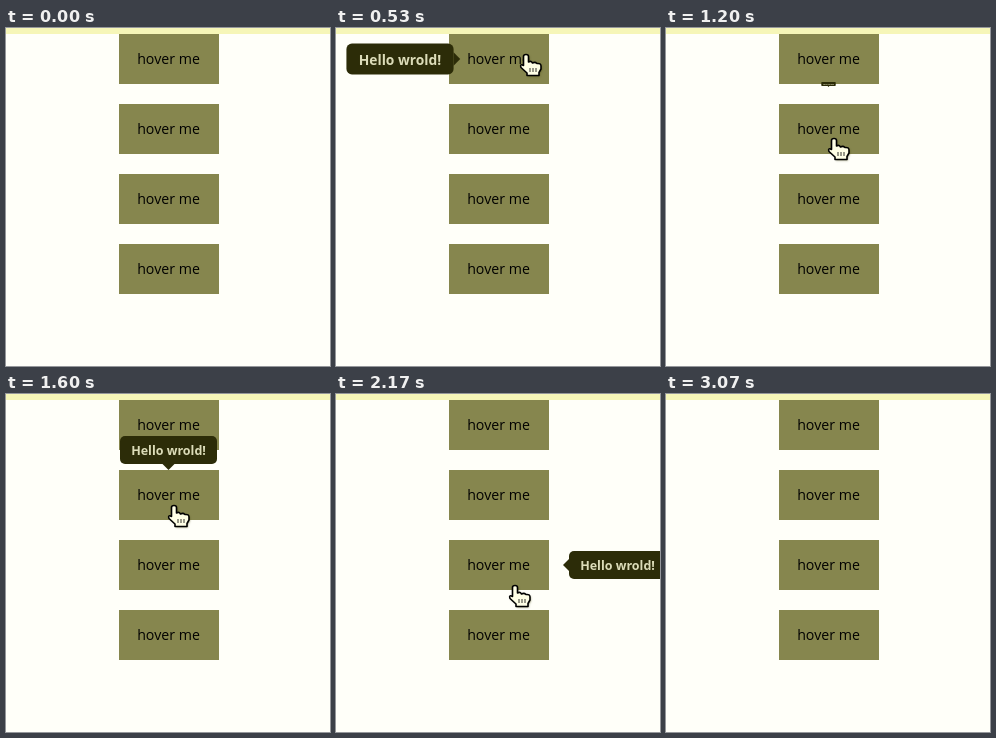
Animation, 324 px wide and 338 px high, one loop 4340 ms. Source, as an HTML page with a canvas:

```html
<!DOCTYPE html>
<html lang="en">
<head>
<meta charset="utf-8">
<title>Tooltips</title>
<style>
html, body { margin: 0; width: 100%; height: 100%; overflow: hidden; background: #fffff9; }
canvas { display: block; }
</style>
</head>
<body>
<canvas id="stage" width="324" height="338"></canvas>
<script>
const ctx = document.getElementById('stage').getContext('2d');
const LOOP = 4340, GROW = 200;
const FONT = '"Open Sans", "Noto Sans", sans-serif';
const BOX = { x: 113, w: 100, h: 50 };
const boxTop = i => 6 + 70 * i;

// One per button: body centre and the direction its arrow points
const tips = [
  { x: 64,    y: 31,  dx: 1,  dy: 0 },
  { x: 162.5, y: 56,  dx: 0,  dy: 1 },
  { x: 281.5, y: 171, dx: -1, dy: 0 },
  { x: 162.5, y: 290, dx: 0,  dy: -1 }
];

// Pointer moves; it rests between them
const entry = { x: 303, y: 168 };
const moves = [
  { from: 100,  to: 285,  x: 250, y: 60 },
  { from: 285,  to: 400,  x: 190, y: 26 },
  { from: 970,  to: 1000, x: 184, y: 57 },
  { from: 1000, to: 1202, x: 168, y: 111 },
  { from: 1590, to: 1740, x: 177, y: 182 },
  { from: 2140, to: 2220, x: 190, y: 239 },
  { from: 2815, to: 2920, x: 304, y: 153 }
];

function pointerAt(time) {
  if (time < moves[0].from || time > moves.at(-1).to) return null;
  let { x, y } = entry;
  for (const m of moves) {
    const k = Math.min(1, Math.max(0, (time - m.from) / (m.to - m.from))) ** 2;
    x += (m.x - x) * k;
    y += (m.y - y) * k;
  }
  return { x, y };
}

// Find when the pointer enters and leaves each button
for (let time = 0; time < LOOP; time++) {
  const p = pointerAt(time);
  if (!p || p.x < BOX.x || p.x >= BOX.x + BOX.w) continue;
  tips.forEach((tip, i) => {
    if (p.y < boxTop(i) || p.y >= boxTop(i) + BOX.h) return;
    tip.on ??= time;
    tip.off = time + 1;
  });
}

const bezier = (a, b, u) => 3 * a * u * (1 - u) ** 2 + 3 * b * u * u * (1 - u) + u ** 3;

// Ease in and out with overshoot on both ends
function easeBack(t) {
  if (t <= 0) return 0;
  if (t >= 1) return 1;
  let lo = 0, hi = 1;
  for (let i = 0; i < 24; i++) {
    const mid = (lo + hi) / 2;
    if (bezier(0.68, 0.265, mid) < t) lo = mid; else hi = mid;
  }
  return bezier(-0.6, 1.6, lo);
}

function label(text, x, y, font, color) {
  ctx.font = `${font} ${FONT}`;
  ctx.fillStyle = color;
  ctx.fillText(text, x, y);
}

function drawTip({ x, y, dx, dy, on, off }, now) {
  const scale = easeBack((now - on) / GROW) - easeBack((now - off) / GROW);
  if (!scale) return;
  const ax = dx * 48.5, ay = dy * 14;
  ctx.save();
  ctx.translate(x, y);
  ctx.scale(scale, scale);
  ctx.fillStyle = '#2c2c08';
  ctx.beginPath();
  ctx.roundRect(-48.5, -14, 97, 28, 5);
  ctx.fill();
  ctx.beginPath();
  ctx.moveTo(ax + dy * 6, ay + dx * 6);
  ctx.lineTo(ax + dx * 6, ay + dy * 6);
  ctx.lineTo(ax - dy * 6, ay - dx * 6);
  ctx.fill();
  label('Hello wrold!', 0, 5, 'bold 12.5px', '#dcdcb8');
  ctx.restore();
}

const hand = new Path2D('M-2.5 10V2.5Q-2.5 .5 0 .5T2.5 2.5V8Q5 6.5 6.5 9Q9 7.5 11 9.5' +
  'Q15 9 15 12V15L13 18.5V21.5H1V19L-5 13.5Q-6.5 9.5-2.5 11.5Z');
const creases = new Path2D('M4 14V18M7 14V18M10 14V18');

function drawPointer(now) {
  const p = pointerAt(now);
  if (!p) return;
  ctx.save();
  ctx.translate(Math.round(p.x), Math.round(p.y));
  ctx.shadowColor = 'rgba(60, 60, 0, .5)';
  ctx.shadowBlur = 2;
  ctx.shadowOffsetX = ctx.shadowOffsetY = 1;
  ctx.fillStyle = '#ffffe6';
  ctx.fill(hand);
  ctx.shadowColor = 'transparent';
  ctx.lineWidth = 1.6;
  ctx.lineJoin = 'round';
  ctx.stroke(hand);
  ctx.lineWidth = 0.8;
  ctx.stroke(creases);
  ctx.restore();
}

function draw() {
  const now = performance.now() % LOOP;
  ctx.textAlign = 'center';
  ctx.fillStyle = '#fffff9';
  ctx.fillRect(0, 0, 324, 338);
  ctx.fillStyle = '#f6f6b8';
  ctx.fillRect(0, 0, 324, 6);
  tips.forEach((_, i) => {
    ctx.fillStyle = '#86864e';
    ctx.fillRect(BOX.x, boxTop(i), BOX.w, BOX.h);
    label('hover me', 162.5, boxTop(i) + 30, '14.2px', '#000');
  });
  tips.forEach(tip => drawTip(tip, now));
  drawPointer(now);
  requestAnimationFrame(draw);
}
draw();
</script>
</body>
</html>
```
